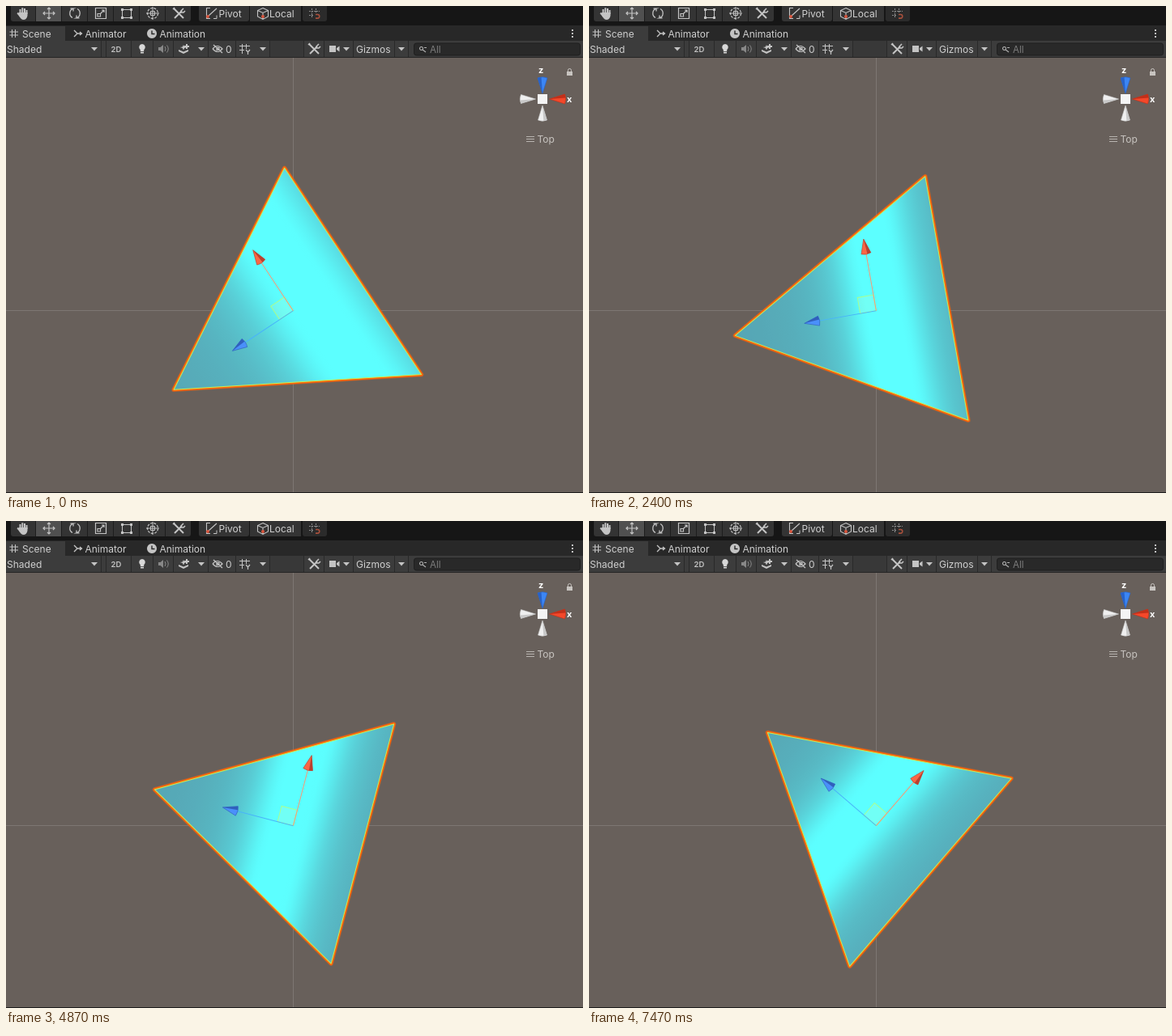
An HTML page with a canvas for the animation above (7540 ms loop, 712 by 602 pixels).

```html
<!DOCTYPE html>
<html lang="en">
<head>
<meta charset="utf-8">
<title>Rotating triangle in a scene view</title>
<style>
html, body { margin: 0; width: 100%; height: 100%; overflow: hidden; background: #68605b; }
canvas { display: block; }
</style>
</head>
<body>
<canvas id="stage" width="712" height="602"></canvas>
<script>
const ctx = document.getElementById('stage').getContext('2d');
const LOOP = 7540, FRAME = 200 / 3;
const CX = 354.4, CY = 376.7, RADIUS = 176.7;
const INK = '#c4c4c4';

function box(x, y, w, h, color, r = 0) {
  ctx.fillStyle = color;
  ctx.beginPath();
  ctx.roundRect(x, y, w, h, r);
  ctx.fill();
}

function line(d, color = INK, width = 1.2) {
  ctx.strokeStyle = color;
  ctx.lineWidth = width;
  ctx.stroke(new Path2D(d));
}

function shape(d, color = INK) {
  ctx.fillStyle = color;
  ctx.fill(new Path2D(d));
}

function text(s, x, y, color = '#d0d0d0', size = 12, weight = 400) {
  ctx.font = `${weight} ${size}px Inter, Arial, sans-serif`;
  ctx.fillStyle = color;
  ctx.fillText(s, x, y);
}

function at(x, y, angle, draw) {
  ctx.save();
  ctx.translate(x, y);
  ctx.rotate(angle);
  draw();
  ctx.restore();
}

// Cone with its base at (x, y), pointing along the angle
function cone(x, y, angle, length, half, light, dark) {
  at(x, y, angle, () => {
    shape(`M${length} 0L0 ${-half}Q-2.5 0 0 ${half}Z`, light);
    shape(`M${length} 0L-1 ${half * .25}L0 ${half}Z`, dark);
    line(`M${length} 0L0 ${-half}Q-2.5 0 0 ${half}Z`, dark, .6);
  });
}

const caret = x => shape(`M${x} 51h8l-4 4.5z`);

function wrench(x, y) {
  line(`M${x - 5} ${y + 6}L${x + 4} ${y - 3}M${x - 6} ${y - 6}L${x + 6} ${y + 6}`, INK, 2);
  line(`M${x + 6} ${y - 6}l-3 3v2h3l2 -2M${x - 7} ${y - 5}l2 -2`, INK, 1.6);
}

function mainToolbar() {
  box(0, 0, 712, 25, '#161616');
  box(6, -4, 222, 23, '#343434', 3);
  box(37, 0, 31, 19, '#505050');
  for (let x = 37; x < 220; x += 32) box(x - 1, 0, 1, 19, '#1d1d1d');
  box(238, -4, 62, 23, '#343434', 3);
  box(301, -4, 63, 23, '#343434');
  box(366, -4, 30, 23, '#2b2b2b', 3);

  // Hand, move, rotate, scale
  line('M17.5 10V4M20.3 9V2.2M23 9V3M25.5 10V5M18 13L14.2 8.5', INK, 2);
  shape('M16 8h10.5v4q-1 5 -5 5q-3 0 -5.5 -5z');
  line('M53 2V16M46 9H60M51 4l2 -2l2 2M51 14l2 2l2 -2M48 7l-2 2l2 2M58 7l2 2l-2 2');
  line('M82 14.5A6.2 6.2 0 0 1 83 3.2H79.5M88 3.5A6.2 6.2 0 0 1 87 14.8H90.5M83 3.2V6.5M87 14.8V11.5', INK, 1.3);
  line('M110.5 2.5h13v13h-13zM113 13v-3.5h3.5V13zM116.5 9.5l4.5 -4.5M118 5h3v3');
  // Rect, transform, custom tools
  line('M143.5 4.5h11v10h-11z', INK, 1);
  for (const x of [142, 153]) for (const y of [3, 13]) box(x, y, 3, 3, INK);
  ctx.setLineDash([3, 1.5]);
  line('M181 2.5a6.5 6.5 0 1 0 .01 0');
  ctx.setLineDash([]);
  line('M181 1V17M173 9H189M178.5 6.5h5v5h-5z', INK, 1);
  wrench(213, 9);

  // Pivot, local, snap
  line('M252 2.5H247.5V15.5H252M250 12L260 3', INK, 1.1);
  box(247, 11, 4, 4, '#d8543c', 2);
  line('M256 15.5h4v-4', INK, 1);
  text('Pivot', 262.5, 14);
  line('M317 2.5l6.5 3v7.5l-6.5 3.5l-6.5 -3.5V5.5zM310.5 5.5l6.5 3l6.5 -3M317 8.5v8', INK, 1.1);
  box(315, 11, 4, 4, '#d8543c', 2);
  text('Local', 325, 14);
  ctx.setLineDash([2, 1]);
  line('M377.5 3V15M382.5 3V8M374 6.5H387M374 11.5H380', '#8a8a8a', 1);
  ctx.setLineDash([]);
  line('M382 10.5h2.5a2.3 2.3 0 0 1 0 4.6H382', '#a8503c', 1.6);
}

function tabs() {
  box(0, 24, 712, 19, '#282828');
  box(0, 25, 73, 18, '#3c3c3c');
  line('M7.5 29V39M11.5 29V39M4.5 32H15M4.5 36H15', INK, 1);
  text('Scene', 20, 39);
  line('M84 30l4 4l-4 4M88 34h5M91 32l2.5 2l-2.5 2', INK, 1.3);
  text('Animator', 97.5, 39);
  shape('M180 28a6 6 0 1 0 .01 0z');
  line('M180 30.5V34.5H183.5', '#282828', 1.4);
  text('Animation', 189.5, 39);
  for (const y of [29, 33, 37]) box(698, y, 2, 2, INK);
}

function sceneToolbar() {
  box(0, 43, 712, 21, '#3c3c3c');
  box(0, 63, 712, 1, '#252525');
  box(326, 43, 42, 20, '#383838');
  for (const x of [117, 123, 154, 181, 206, 249, 283, 325, 367, 392, 428, 479, 496])
    box(x, 43, 1, 20, '#292929');
  text('Shaded', 1, 58);
  caret(105);
  text('2D', 129.5, 57, INK, 9.5, 600);
  shape('M168 47a4 4 0 0 0 -2.2 7.2v2h4.4v-2A4 4 0 0 0 168 47zM166 57h4v1.5h-4z', '#d8d8d8');
  shape('M188 51h2.5l3.5 -3v10l-3.5 -3H188z', '#888');
  line('M196 50q2 3 0 6M198.5 48.5q3.5 4.5 0 9', '#888', 1);
  shape('M219 48l1.2 2.5l2.8 .5l-2.8 1l-1.2 2.5l-1.2 -2.5l-3 -1l3 -.5zM213 54l6 2.5l6 -2.5v2l-6 3l-6 -3zM222 47h2v2h2v2h-2v2h-2v-2h-2v-2h2z');
  caret(237);
  line('M255 53q6 -7 12 0q-6 7 -12 0M256 48l11 10M260 51.5h3v3h-3z');
  text('0', 271, 58);
  line('M291.5 47V59M296.5 47V53M288 49.5H301M288 54.5H294', INK, 1);
  line('M296 54l2.5 3l2.5 -3M298.5 57v3', INK, 1.2);
  caret(313);
  wrench(380, 53);
  shape('M399 49h8v8h-8zM408 52l3.5 -2.5v7l-3.5 -2.5z');
  caret(416);
  text('Gizmos', 432, 58);
  caret(484);
  box(503, 45.5, 206, 16, '#1f1f1f', 4);
  box(504, 46.5, 204, 14, '#292929', 3);
  line('M512.5 50.5a2 2 0 1 0 .01 0M514 54l4 3M516 51.5h3', '#b0b0b0', 1.1);
  text('All', 523, 57.5, '#7d7d7d', 11.5);
}

function orientation() {
  const up = -Math.PI / 2;
  cone(662, 89, -up, 19, 6, '#3c86f4', '#2862c8');
  cone(689.5, 115, Math.PI, 19, 6, '#f4482a', '#c0301a');
  cone(635.5, 115, 0, 18, 5.5, '#efefef', '#c8c8c8');
  cone(662, 141, up, 18, 5.5, '#efefef', '#c8c8c8');
  box(656, 109, 12, 12, '#f4f4f4');
  text('z', 657, 83, '#fff', 11, 700);
  text('x', 692, 118.5, '#fff', 11, 700);
  box(692, 81, 7, 5, '#c8c4c0');
  line('M693.5 81V79.5a2 2 0 0 1 4 0V81', '#c8c4c0', 1);
  line('M642 161.5H652M642 164.5H652M642 167.5H652', '#b8b4b0', 1);
  text('Top', 655.5, 169, '#c8c4c0');
}

// Anisotropic sheen across the triangle's own x axis
function sheen(degrees, spread) {
  const from = -RADIUS, to = RADIUS / 2, steps = 40;
  const centre = 3 - .65 * degrees;
  const g = ctx.createLinearGradient(from, 0, to, 0);
  for (let i = 0; i <= steps; i++) {
    const x = from + (to - from) * i / steps;
    const d = Math.max(0, Math.abs(x - centre) / spread - 18) / 37;
    const k = 1 / (1 + d * d);
    g.addColorStop(i / steps, `rgb(${86 + 6 * k},${162 + 93 * k},${177 + 78 * k})`);
  }
  return g;
}

function triangle(degrees, spread) {
  at(CX, CY, degrees * Math.PI / 180, () => {
    const x = RADIUS / 2, y = RADIUS * Math.sqrt(3) / 2;
    const d = `M${-RADIUS} 0L${x} ${-y}L${x} ${y}Z`;
    ctx.lineJoin = 'round';
    line(d, 'rgba(255,100,0,.45)', 5.6);
    line(d, '#ff6408', 4);
    shape(d, sheen(degrees, spread));
    line(d, '#c4ee58', 1);
    ctx.lineJoin = 'miter';

    box(-20, -20, 20, 20, 'rgba(225,255,190,.16)');
    line('M-20 -20H0V0H-20Z', 'rgba(190,255,110,.75)', 1);
    line('M0 0V-73', '#f49a78', 1);
    line('M0 0H-73', '#48b4fa', 1);
    cone(0, -72, -Math.PI / 2, 18, 6, '#fa6644', '#b84030');
    cone(-72, 0, Math.PI, 18, 6, '#4a90fa', '#3060bc');
  });
}

function draw(now) {
  const t = now % LOOP;
  const time = Math.floor((t + 4) / FRAME) * FRAME;
  const early = Math.max(0, 1 - time / 930);
  const degrees = (time - 3400) / 100 + .5 * early;

  box(0, 0, 712, 602, '#68605b');
  box(354, 64, 1, 537, '#7d7773');
  box(0, 376, 712, 1, '#7d7773');
  triangle(degrees, 1 + .35 * early);
  orientation();
  mainToolbar();
  tabs();
  sceneToolbar();
  box(0, 601, 712, 1, '#1c1c1c');
}

const start = performance.now();
function tick() {
  draw(performance.now() - start);
  requestAnimationFrame(tick);
}
tick();
</script>
</body>
</html>
```
